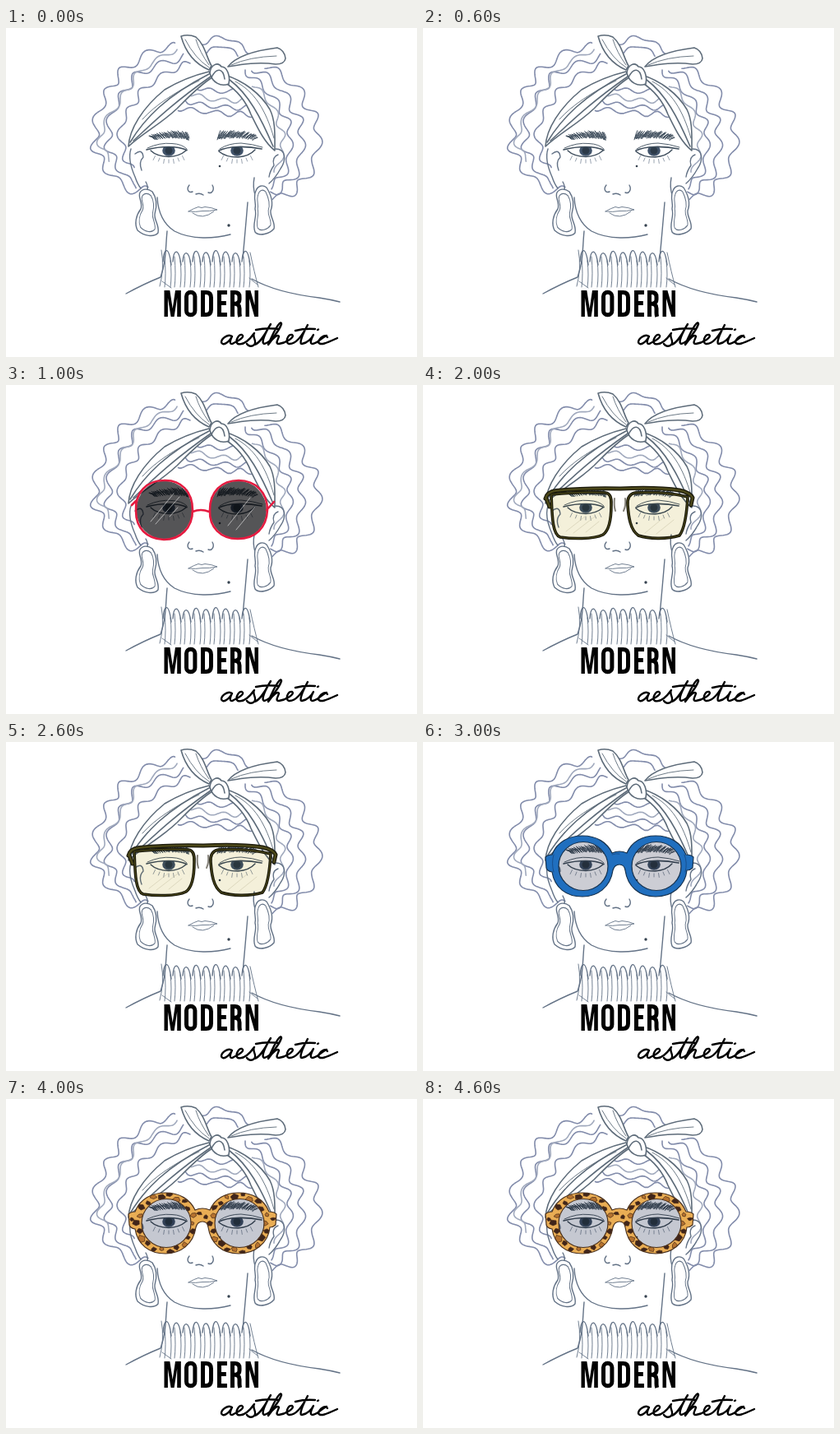
Recreate the animation shown at these times as an HTML page. Size 500 px wide and 400 px high, loop 5 s.

```html
<!DOCTYPE html>
<html lang="en">
<head>
<meta charset="utf-8">
<title>Modern aesthetic</title>
<style>
html, body { margin: 0; width: 100%; height: 100%; overflow: hidden; background: #fff; }
svg { display: block; width: 500px; height: 400px; }
.line { fill: none; stroke: #637286; stroke-width: 1.4; stroke-linecap: round; stroke-linejoin: round; }
.hair { stroke-width: 1.6; }
.band { fill: #fff; stroke: #5d6b79; stroke-width: 1.6; }
.thin { stroke-width: .9; }
.dark { stroke: #3f4e5d; }
.lens { mix-blend-mode: multiply; }
.glint { fill: none; stroke: #fff; stroke-width: 1; stroke-linecap: round; opacity: .55; }
</style>
</head>
<body>
<svg viewBox="0 0 500 400" role="img" aria-label="MODERN aesthetic">
  <defs>
    <path id="rims" fill-rule="evenodd" d="M149 140Q152 137 157 137C163 121 178 114 194 114C211 114 224 122 230 135Q239 131 248 135C254 121 267 114 283 114C300 114 314 122 320 137Q326 137 329 140L328 153Q325 156 321 156C319 176 302 188 283 188C263 188 249 176 246 156Q245 149 239 149Q233 149 231 156C228 177 212 188 194 188C174 188 160 177 157 158Q151 157 150 153Z
      M165 151a30 29.5 0 1 0 60 0a30 29.5 0 1 0 -60 0Z M254 151a30 29.5 0 1 0 60 0a30 29.5 0 1 0 -60 0Z"/>
    <clipPath id="rimClip"><use href="#rims" clip-rule="evenodd"/></clipPath>
    <g id="roundLenses"><ellipse cx="195" cy="151" rx="30" ry="29.5"/><ellipse cx="284" cy="151" rx="30" ry="29.5"/></g>
    <path id="squareRims" d="M157 133Q192 129 222 131Q230 132 229 146C229 162 226 177 219 182C207 188 180 187 167 185C157 182 157 157 156 133M249 146Q248 133 258 131Q292 129 322 136C321 155 318 175 312 183C296 188 274 187 262 183C252 176 250 160 249 146"/>
    <path id="browBar" d="M149 138Q151 130 162 128.500Q198 125 240 126Q285 124 312 128Q325 131 328 137L326 146M150 138L154 148"/>
    <path id="leftDrop" d="M163 200C160 206 167 212 164 220C158 228 156 238 160 246C168 253 180 255 185 249C187 240 180 234 181 226C184 216 183 206 178 199C173 195 166 195 163 200Z"/>
    <path id="rightDrop" d="M304 198C300 206 305 212 303 220C306 230 299 238 303 248C308 254 321 250 326 244C328 236 321 230 322 222C326 212 322 202 317 194C312 190 306 192 304 198Z"/>
    <clipPath id="openEyes"><rect x="170" y="144.500" width="150" height="20"/></clipPath>
  </defs>
  <rect width="500" height="400" fill="#fff"/>

  <g id="hair" class="line hair"></g>

  <g class="line">
    <!-- ears, jaw, neck, shoulders -->
    <path d="M152 147C148 159 153 172 157 181Q160 190 164 195M157 153Q166 146 167 157Q161 163 165 173M328 147C341 147 341 161 334 171Q328 182 320 189M331 154Q323 157 326 167Q321 174 320 181"/>
    <path d="M170 187Q173 192 172 197M184 206C185 224 191 238 205 247C226 258 254 256 273 251M302 182Q300 193 303 203M294 212Q291 248 288 280"/>
    <path d="M196 247C194 268 195 284 188 303Q168 311 146 323M299 305C322 318 356 325 381 328Q394 330 406 333"/>
    <path d="M189 270Q193 292 187 314M297 273Q302 297 307 315M190 308L201 316M296 304L306 312" class="thin"/>
    <g id="ribs"></g>
    <!-- nose, lips -->
    <path d="M223 191C219 196 222 201 227 199M231 202Q236 200 240 203M251 191C254 196 251 202 246 200"/>
    <path class="thin" d="M222 223Q229 219 234 217.500Q238 219.500 242 217.500Q250 218 257 221Q247 223 239 222.500Q231 224 222 223M227 225Q239 234 253 223"/>
    <!-- earrings -->
    <g fill="#fff">
      <use href="#leftDrop"/><use href="#leftDrop" transform="translate(172 225) scale(.7 .82) translate(-172 -225)"/>
      <use href="#rightDrop"/><use href="#rightDrop" transform="translate(313 221) scale(.68 .82) translate(-313 -221)"/>
    </g>
  </g>

  <g class="line band">
    <path d="M149 144C150 123 166 97 193 75Q218 60 247 53L251 60C235 70 222 84 208 98C188 117 166 128 149 144Z"/>
    <path d="M266 57C289 64 310 80 321 99C328 113 327 130 327 149C314 139 306 121 298 105C291 87 280 75 266 66Z"/>
    <path fill="none" d="M151 139C169 109 196 82 247 56M155 137C180 114 202 92 249 59M272 63C295 80 310 109 325 144"/>
    <path class="thin" fill="none" d="M166 111C181 94 207 77 235 64M279 65C302 77 316 99 326 134"/>
    <path d="M247 51C231 44 219 32 213 10Q222 7 231 11C242 20 244 36 250 46Z"/>
    <path d="M270 47C280 34 306 27 330 24Q339 27 340 37Q339 44 328 44C307 41 288 44 270 47Z"/>
    <path class="thin" fill="none" d="M218 14Q230 37 247 48M231 14Q236 30 247 45M274 45Q296 35 329 34"/>
    <path d="M248 55C249 44 258 41 262 47C269 47 273 58 271 68C261 72 251 66 248 55ZM250 60C256 48 264 48 266 62"/>
  </g>

  <!-- eyes and brows -->
  <g id="brows" class="line dark"></g>
  <g class="line dark">
    <g clip-path="url(#openEyes)" fill="#41536a" stroke="none">
      <ellipse cx="198" cy="149" rx="7.800" ry="6.800"/><ellipse cx="281" cy="149" rx="7.800" ry="6.800"/>
      <ellipse cx="198" cy="149" rx="4.500" ry="4.500" fill="#2c3a48"/><ellipse cx="281" cy="149" rx="4.500" ry="4.500" fill="#2c3a48"/>
    </g>
    <path stroke-width="1.700" d="M171 148Q184 144.500 198 144.500Q211 144.500 220 148.500M259 149Q268 145 281 144.500Q297 144 311 147"/>
    <path d="M176 149Q183 156 198 156.500Q211 156 219 149M259 150Q267 157 282 157Q296 156 303 148"/>
    <path class="thin" d="M172 146Q187 139 202 140.500Q214 141 220 147M260 147Q271 140 286 140Q300 141 312 145"/>
    <path id="lashes" class="thin" stroke="#8d98a6"/>
  </g>
  <circle cx="260" cy="168" r="1.300" fill="#35424f"/>
  <circle cx="271" cy="240" r="1.700" fill="#35424f"/>

  <g class="look"></g>

  <g class="look">
    <g class="lens" fill="#555557"><ellipse cx="192.500" cy="152" rx="34" ry="35.500"/><ellipse cx="282.500" cy="152" rx="34.500" ry="35.500"/></g>
    <path class="glint" d="M176 166L204 132M182 169L211 136M199 160L209 149M270 171L297 137M280 176L303 148"/>
    <path fill="none" stroke="#e51b40" stroke-width="2.600" stroke-linecap="round" d="M192 116C213 115 227 130 227 152C227 174 212 188 192 188C171 187 158 174 158 153C157 131 171 116 192 116ZM283 116C304 116 318 131 318 152C317 174 303 187 282 187C261 187 247 173 248 152C248 130 262 116 283 116ZM227 154Q237 150 247 154M158 141L153 146M317 152L326 142"/>
  </g>

  <g class="look">
    <use class="lens" href="#squareRims" fill="#f4f0da"/>
    <path class="glint" style="stroke:#c9c3a6" d="M174 178L197 160M183 180L209 160M198 179L214 166M270 180L293 161M284 181L305 164"/>
    <path fill="none" stroke="#85827a" stroke-width="2" stroke-linecap="round" d="M233 138Q232 147 234 153M246 138Q247 147 244 153"/>
    <g fill="none" stroke-linejoin="round" stroke-linecap="round">
      <g stroke="#19180b"><use href="#squareRims" stroke-width="3.600"/><use href="#browBar" stroke-width="5"/></g>
      <g stroke="#4b4719"><use href="#squareRims" stroke-width="1.200"/><use href="#browBar" stroke-width="2.600"/></g>
    </g>
  </g>

  <g class="look">
    <use class="lens" href="#roundLenses" fill="#cccdd4"/>
    <use href="#rims" fill="#206fbf" stroke="#17324e" stroke-width="1.200"/>
    <path class="line thin" style="stroke:#174b87" d="M159 137Q156 147 159 158M318 137Q322 147 319 158M230 137Q235 135 239 136"/>
  </g>

  <g class="look">
    <use class="lens" href="#roundLenses" fill="#c5c8d1"/>
    <use href="#rims" fill="#e9ad54"/>
    <g id="spots" clip-path="url(#rimClip)"></g>
    <use href="#rims" fill="none" stroke="#49301e" stroke-width="1.200"/>
  </g>

  <!-- condensed capitals -->
  <g fill="none" stroke="#000" stroke-width="5" transform="translate(0 -1)">
    <path fill="#000" stroke="none" d="M192.500 352V320H199.300L202.700 342L206 320H212.800V352H208.200V329L204.600 352H200.600L196.900 329V352ZM291.500 352V320H297.400L302.500 338V320H307V352H302.300L296 330V352Z"/>
    <rect x="219.500" y="322.300" width="10.400" height="27.400" rx="5"/>
    <path d="M239.500 322.500H243.500Q249.500 322.500 249.500 329V343Q249.500 349.500 243.500 349.500H239.500ZM269 322.500H259.500V349.500H269M259.500 335.600H267.800M275.500 352V322.500H278.500Q284 322.500 284 328V331Q284 336.300 278.500 336.300H275.500M278.500 336.300Q284 336.500 284 342V347Q284 350 284.700 352"/>
  </g>
  <!-- script word -->
  <path fill="none" stroke="#000" stroke-width="2.400" stroke-linecap="round" stroke-linejoin="round"
    d="M275 375C270 371 262 378 262 382C263 387 271 383 275 375C271 383 273 386 277 383C284 380 291 375 287 373C283 372 278 381 282 384C289 386 297 378 302 371C299 376 306 381 302 385C299 388 295 387 293 384M302 385C309 384 317 369 322 360C315 371 310 383 314 384C322 383 333 366 335 360C335 355 329 361 319 385C325 376 331 372 332 375C331 379 327 384 332 384C340 383 352 376 348 373C343 372 339 382 344 384C354 385 362 371 367 361C361 372 356 384 360 384C367 383 372 377 374 373C371 379 369 384 373 384C380 383 384 376 390 374
      M391 376C389 371 381 377 380 382C382 387 392 382 403 377M304 367Q317 364 332 366M352 368Q363 365 376 366M379 367L380 366.500"/>
</svg>
<script>
const NS = 'http://www.w3.org/2000/svg';
const byId = id => document.getElementById(id);

function addPath(parent, d, attrs = {}) {
  const p = document.createElementNS(NS, 'path');
  p.setAttribute('d', d);
  for (const k in attrs) p.setAttribute(k, attrs[k]);
  parent.append(p);
}

function seeded(seed) {
  return () => (seed = (seed * 16807) % 2147483647) / 2147483647;
}

function spline(a, b, c, d, t) {
  return .5 * (2 * b + (c - a) * t + (2 * a - 5 * b + 4 * c - d) * t * t + (3 * b - a - 3 * c + d) * t ** 3);
}

// A smooth guide line with an uneven ripple along its normal.
function ripple(guide, amp, length, phase) {
  const n = guide.split(' ').map(s => s.split(',').map(Number));
  const at = i => n[Math.max(0, Math.min(n.length - 1, i))];
  const pts = [];
  for (let i = 0; i < n.length - 1; i++)
    for (let t = 0; t < 1; t += .06)
      pts.push([0, 1].map(k => spline(at(i - 1)[k], at(i)[k], at(i + 1)[k], at(i + 2)[k], t)));
  pts.push(at(n.length - 1));
  let s = 0;
  return 'M' + pts.map((p, i) => {
    const q = pts[Math.max(0, i - 1)], r = pts[Math.min(pts.length - 1, i + 1)];
    const dx = r[0] - q[0], dy = r[1] - q[1], len = Math.hypot(dx, dy) || 1;
    s += Math.hypot(p[0] - q[0], p[1] - q[1]);
    const turn = s / length * 2 * Math.PI + phase;
    const o = amp * (Math.sin(turn + .5 * Math.sin(turn * .37)) + .25 * Math.sin(turn * .6));
    return (p[0] - dy / len * o).toFixed(1) + ' ' + (p[1] + dx / len * o).toFixed(1);
  }).join('L');
}

const strands = [
  ['206,24 180,27 151,46 130,66 118,91 109,116 108,140 118,165 132,184 154,196 172,199', 5.5, 34, 1],
  ['217,36 182,46 155,62 139,85 127,111 124,138 133,163 147,184 160,191', 5, 32, 2],
  ['224,43 191,57 166,77 149,101 139,125 142,148 153,171', 4, 30, 0],
  ['208,26 188,36 166,51 148,73 134,96 118,119 115,141 127,161', 3.5, 32, 3],
  ['318,45 337,59 357,76 369,98 379,121 380,147 371,171 357,193 342,203 324,207', 5.5, 35, 2],
  ['302,48 329,69 349,96 359,124 360,153 351,178 337,195 322,200', 5, 33, 1],
  ['291,51 316,75 337,102 346,132 344,161 334,183 321,193', 4, 30, 0],
  ['302,69 325,97 335,126 336,153 328,176', 3.5, 29, 2],
  ['237,20 258,11 281,18 299,32', 2.2, 28, 0],
  ['243,29 264,22 283,33', 2, 24, 2],
  ['234,72 257,77 282,76', 2.8, 27, 1],
  ['226,80 253,87 290,88', 3, 27, 2],
  ['218,88 249,95 296,97', 3, 28, 0],
  ['210,97 245,102 301,106', 3.2, 29, 1]
];
strands.forEach(([guide, amp, length, phase], i) =>
  addPath(byId('hair'), ripple(guide, amp, length, phase), { stroke: i % 4 > 2 ? '#a0a9bd' : '#828cab' }));

// Knitted collar
for (let i = 0; i < 9; i++) {
  const x = 191 + i * 12, top = 264 + i * 7 % 5;
  addPath(byId('ribs'), `M${x} 284C${x + 1} ${top + 3} ${x + 7} ${top} ${x + 10} 288`);
  addPath(byId('ribs'), `M${x + 2} 278Q${x + 4} 300 ${x + 2} 315M${x + 9} 283Q${x + 11} 301 ${x + 9} 315`, { class: 'thin' });
}

// Eyebrow hairs lean outwards from the nose.
const rnd = seeded(41);
function brow(inner, dir) {
  for (let i = 0; i < 60; i++) {
    const u = i / 59, x = inner + dir * u * 43;
    const y = 134 - 2.5 * Math.sin(u * Math.PI) + rnd() * 2.5;
    const h = (8 - 4 * u) * (.7 + rnd() * .5);
    addPath(byId('brows'), `M${x} ${y}Q${x + dir} ${y - h * .6} ${x + dir * (3 + 3 * u)} ${y - h}`, { 'stroke-width': 1 });
  }
}
brow(223, -1);
brow(257, 1);

let lashes = '';
for (const cx of [198, 281])
  for (let i = -3; i <= 3; i++) {
    const x = cx + i * 5.5, y = 160 - i * i * .5;
    lashes += `M${x} ${y}l${i * .8} ${4 + (i & 1)}`;
  }
byId('lashes').setAttribute('d', lashes);

// Tortoiseshell flecks around each rim and over the bridge
const pick = seeded(97);
function fleck(x, y, size, color) {
  const turn = pick() * 6.28;
  const pts = [0, 1, 2, 3, 4].map(k => {
    const a = turn + k * 1.257, r = size * (.65 + pick() * .6);
    return (x + Math.cos(a) * r).toFixed(1) + ' ' + (y + Math.sin(a) * r * .8).toFixed(1);
  });
  addPath(byId('spots'), 'M' + pts.join('L') + 'Z',
    { fill: color, stroke: '#4a2c18', 'stroke-width': .7, 'stroke-linejoin': 'round' });
}
for (const cx of [194, 283])
  for (let i = 0; i < 22; i++) {
    const a = i / 22 * 2 * Math.PI, r = 33.5 + (i % 2 ? 2 : -1.5);
    fleck(cx + Math.cos(a) * r, 151 + Math.sin(a) * r, 3.2 + pick() * 2, i % 3 ? '#40251a' : '#b5722f');
  }
for (const [x, y] of [[235, 139], [243, 143], [153, 146], [325, 146]]) fleck(x, y, 3.2, '#40251a');

// One pair of glasses per second, switched without a fade.
const looks = [...document.querySelectorAll('.look')];
const start = performance.now();
function draw(now) {
  const current = Math.floor(Math.max(0, now - start) / 1000) % looks.length;
  looks.forEach((g, i) => g.style.display = i === current ? '' : 'none');
  requestAnimationFrame(draw);
}
draw(start);
</script>
</body>
</html>
```
